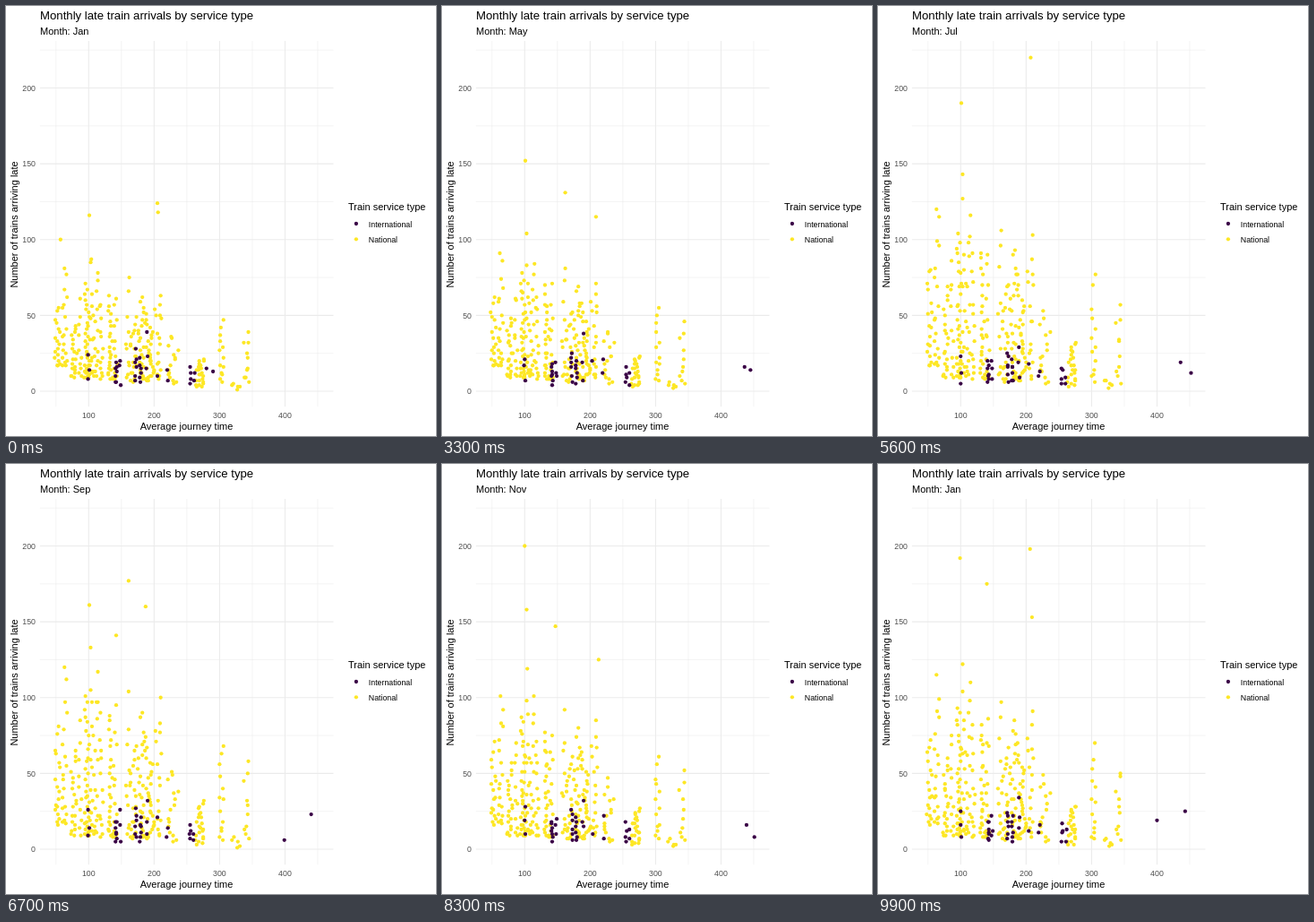
An HTML page that plays this animation: 480x480 px, repeating every 10 s.

```html
<!DOCTYPE html>
<html lang="en">
<head>
<meta charset="utf-8">
<title>Monthly late train arrivals</title>
<style>
  html, body { margin: 0; width: 100%; height: 100%; overflow: hidden; background: #fff; }
  svg { display: block; width: 480px; height: 480px; }
  text { font-family: "Liberation Sans", Arial, sans-serif; font-size: 11px; }
  .title { font-size: 13.2px; }
  .small { font-size: 8.8px; }
  .tick { font-size: 8.8px; fill: #4d4d4d; }
</style>
</head>
<body>
<svg id="chart" viewBox="0 0 480 480"></svg>
<script>
const LOOP = 10000;
const NAMES = ['Jan', 'Feb', 'Mar', 'Apr', 'May', 'Jun', 'Jul', 'Aug', 'Sep', 'Oct', 'Nov', 'Dec'];
const DARK = '#3a0346', LIGHT = '#fde725';

// Start of a month on a 100 ms clock: the label leads, the points follow
const labelStart = i => i && (i < 7 ? 900 * i - 300 : 5100 + 800 * (i - 6));
const pointsStart = i => i && (i < 6 ? 900 * i - 100 : 4400 + 800 * (i - 5));

// Vertical spread, the most extreme national services and the longest international ones
const MONTHS = [
  { level: 1, peaks: [[101, 116], [205, 124], [206, 118], [57, 100]], far: [[280, 15], [290, 13]] },
  { level: 0.98, peaks: [[103, 121]], far: [[402, 12]] },
  { level: 0.95, peaks: [[106, 106], [204, 98], [205, 90]], far: [[410, 13], [436, 18]] },
  { level: 1.1, peaks: [[101, 152], [162, 131], [209, 115]], far: [[436, 16], [445, 14]] },
  { level: 1.3, peaks: [[101, 155], [206, 140]], far: [[425, 12], [437, 18]] },
  { level: 1.5, peaks: [[207, 197], [208, 161], [102, 183], [57, 172]], far: [[426, 15], [439, 22]] },
  { level: 1.5, peaks: [[207, 220], [101, 190]], far: [[436, 19], [452, 12]] },
  { level: 1.45, peaks: [[161, 177], [187, 160], [101, 161], [142, 141]], far: [[399, 6], [440, 23]] },
  { level: 1.4, peaks: [[102, 185], [161, 165]], far: [[438, 14], [450, 17]] },
  { level: 1.25, peaks: [[100, 200], [103, 158], [147, 147], [213, 125]], far: [[439, 16], [451, 8]] },
  { level: 1.3, peaks: [[100, 195], [206, 170]], far: [[440, 15], [454, 12]] },
  { level: 1.35, peaks: [[206, 198], [99, 192], [140, 175], [209, 153]], far: [[400, 19], [443, 25]] }
];

// National routes: journey time, half width, services, usual highest count
const NATIONAL = [
  [52, 5, 17, 57], [64, 4, 18, 86], [78, 5, 19, 46], [87, 2, 10, 64], [97, 4, 32, 72],
  [104, 2, 12, 100], [111, 4, 17, 82], [120, 3, 12, 64], [133, 4, 22, 64], [142, 4, 12, 66],
  [159, 3, 10, 78], [168, 5, 19, 50], [180, 5, 24, 64], [195, 9, 32, 55], [208, 3, 14, 70],
  [229, 8, 15, 38], [268, 8, 22, 22], [302, 5, 13, 52], [325, 8, 5, 6], [340, 5, 10, 42]
];
// International routes: journey time, services, usual highest count
const INTERNATIONAL = [
  [100, 3, 28], [142, 7, 20], [148, 3, 26], [172, 6, 28], [179, 6, 22],
  [189, 3, 40], [204, 1, 24], [220, 2, 22], [255, 4, 18], [261, 2, 14]
];

const svg = document.getElementById('chart');
const px = x => 92.3 + (x - 100) * 0.7305;
const py = y => 430 - y * 1.6925;

function add(parent, tag, attrs, text) {
  const el = document.createElementNS('http://www.w3.org/2000/svg', tag);
  for (const key in attrs) el.setAttribute(key, attrs[key]);
  if (text) el.textContent = text;
  parent.appendChild(el);
  return el;
}
const label = (x, y, text, attrs = {}) => add(svg, 'text', { x, y, ...attrs }, text);
const dot = (parent, cx, cy, fill) =>
  add(parent, 'circle', { cx: cx.toFixed(2), cy: cy.toFixed(2), r: 2.15, fill });

function seeded(seed) {
  return () => {
    seed = (seed + 0x6d2b79f5) | 0;
    let t = Math.imul(seed ^ (seed >>> 15), 1 | seed);
    t = (t + Math.imul(t ^ (t >>> 7), 61 | t)) ^ t;
    return ((t ^ (t >>> 14)) >>> 0) / 4294967296;
  };
}

// Grid, minor lines first
function grid(width, xs, ys) {
  const style = { stroke: '#ebebeb', 'stroke-width': width };
  ys.forEach(v => add(svg, 'line', { x1: 37.9, x2: 365.5, y1: py(v), y2: py(v), ...style }));
  xs.forEach(v => add(svg, 'line', { x1: px(v), x2: px(v), y1: 39, y2: 447.3, ...style }));
}
grid(0.53, [50, 150, 250, 350, 450], [25, 75, 125, 175, 225]);
grid(1.07, [100, 200, 300, 400], [0, 50, 100, 150, 200]);

const groups = MONTHS.map(({ level, peaks, far }, index) => {
  const group = add(svg, 'g', { display: 'none' });
  const place = seeded(42), rnd = seeded(index * 977 + 5);
  const plot = (x, y, color) => dot(group, px(Math.round(x)), py(Math.max(1, Math.round(y))), color);

  // Counts crowd near the low end and thin out upwards
  for (const [x, half, count, top] of NATIONAL) {
    const low = top * 0.12 + Math.max(0, 90 - x) * 0.25;
    for (let i = 0; i < count; i++) {
      const rank = Math.pow((i + rnd()) / count, 1 + top / 100);
      plot(x + (place() * 2 - 1) * half + rnd() - 0.5, low + (top * level - low) * rank, LIGHT);
    }
  }
  peaks.forEach(([x, y]) => plot(x, y, LIGHT));

  for (const [x, count, top] of INTERNATIONAL) {
    for (let i = 0; i < count; i++) {
      plot(x + (rnd() - 0.5) * 3, 4 + (top - 4) * (i + rnd()) / count, DARK);
    }
  }
  far.forEach(([x, y]) => plot(x, y, DARK));
  return group;
});

// Text and legend
label(38, 15, 'Monthly late train arrivals by service type', { class: 'title' });
const subtitle = label(38, 32, 'Month: Jan');
[0, 50, 100, 150, 200].forEach(v => label(33, py(v) + 3.2, String(v), { class: 'tick', 'text-anchor': 'end' }));
[100, 200, 300, 400].forEach(v => label(px(v), 460, String(v), { class: 'tick', 'text-anchor': 'middle' }));
label(201.5, 473, 'Average journey time', { 'text-anchor': 'middle' });
label(0, 0, 'Number of trains arriving late', { 'text-anchor': 'middle', transform: 'translate(13 244) rotate(-90)' });
label(382, 228, 'Train service type');
[['International', DARK], ['National', LIGHT]].forEach(([name, color], i) => {
  const y = 243 + i * 17.3;
  dot(svg, 390.9, y, color);
  label(404.8, y + 3.6, name, { class: 'small' });
});

// Index of the last month that has started by time t
function monthAt(start, t, last) {
  let i = last;
  while (start(i) > t) i--;
  return i;
}

let shown = -1;
function draw(t) {
  const text = 'Month: ' + NAMES[monthAt(labelStart, t, 12) % 12];
  if (subtitle.textContent !== text) subtitle.textContent = text;
  const current = monthAt(pointsStart, t, 11);
  if (current === shown) return;
  groups.forEach((group, i) => group.setAttribute('display', i === current ? 'inline' : 'none'));
  shown = current;
}

const begin = performance.now();
function tick() {
  draw((performance.now() - begin) % LOOP);
  requestAnimationFrame(tick);
}
draw(0);
requestAnimationFrame(tick);
</script>
</body>
</html>
```
